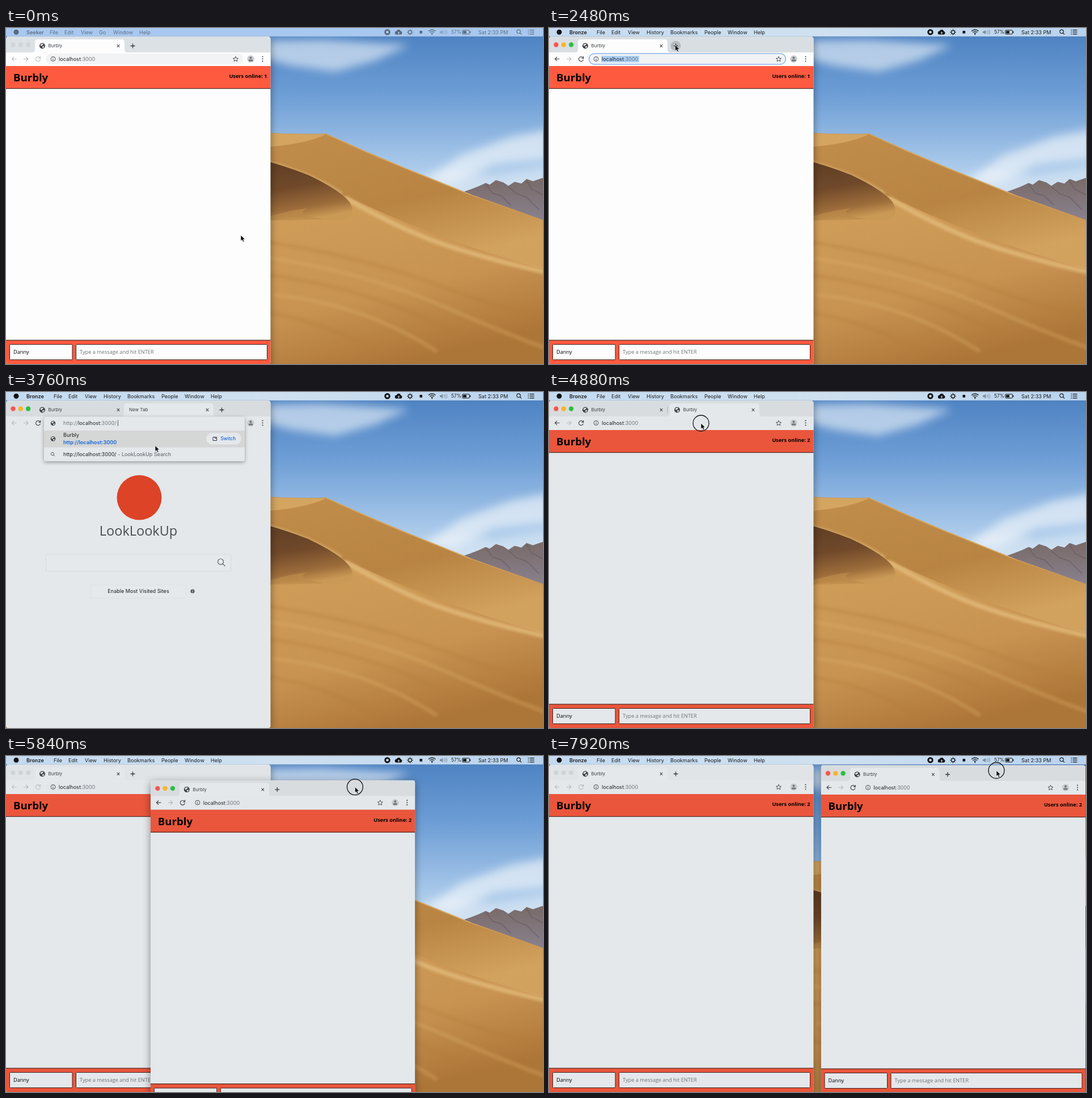
Recreate the animation shown at these times as an HTML page. Size 947 by 592 pixels, loop 8000 ms.

```html
<!DOCTYPE html>
<html lang="en">
<head>
<meta charset="utf-8">
<title>Chat demo</title>
<style>
  html, body { margin: 0; width: 100%; height: 100%; overflow: hidden; background: #c99a58; }
  svg { display: block; width: 947px; height: 592px; }
  text { font: 9.1px Inter, "Liberation Sans", sans-serif; fill: #1b1d20; white-space: pre; }
  .bold { font-weight: 600; }
  .tab { font-size: 8px; fill: #3c4043; }
  .page { font: 9.2px "Open Sans", "Noto Sans", sans-serif; fill: #000; }
  .title { font-size: 18.6px; font-weight: 700; }
  .users { font-weight: 700; }
  .hint { fill: #6f7274; }
  .brand { font: 23.5px "Open Sans", "Noto Sans", sans-serif; fill: #474c4f; }
  .win { filter: drop-shadow(0 4px 7px rgba(0,0,0,.42)); }
</style>
</head>
<body>
<svg viewBox="0 0 947 592">
  <defs>
    <linearGradient id="sky" x1="0" y1="0" x2="0" y2="1">
      <stop offset="0" stop-color="#4a7fc0"/><stop offset=".35" stop-color="#6f9fd6"/>
      <stop offset=".7" stop-color="#a9c9ea"/><stop offset="1" stop-color="#d6e4ef"/>
    </linearGradient>
    <linearGradient id="sand" x1=".2" y1="0" x2=".5" y2="1">
      <stop offset="0" stop-color="#c8934f"/><stop offset=".35" stop-color="#cf9c58"/>
      <stop offset=".7" stop-color="#c89351"/><stop offset="1" stop-color="#ad7639"/>
    </linearGradient>
    <linearGradient id="slope" x1="0" y1="0" x2=".5" y2="1">
      <stop offset="0" stop-color="#c18d4b"/><stop offset=".6" stop-color="#b5803f"/>
      <stop offset="1" stop-color="#d3a460"/>
    </linearGradient>
    <linearGradient id="hollow" x1="0" y1="0" x2=".25" y2="1">
      <stop offset="0" stop-color="#5c3b22"/><stop offset=".5" stop-color="#70492a"/>
      <stop offset=".82" stop-color="#9c6c3a"/><stop offset="1" stop-color="#c99955"/>
    </linearGradient>
    <linearGradient id="rock" x1="0" y1="0" x2="0" y2="1">
      <stop offset="0" stop-color="#796a68"/><stop offset="1" stop-color="#8a8391"/>
    </linearGradient>
    <linearGradient id="bar">
      <stop offset="0" stop-color="#c4daf0"/><stop offset=".5" stop-color="#cfe1f0"/><stop offset="1" stop-color="#b9d3ee"/>
    </linearGradient>
    <filter id="soft" x="-40%" y="-80%" width="180%" height="260%"><feGaussianBlur stdDeviation="8"/></filter>
    <filter id="haze" x="-20%" y="-40%" width="140%" height="180%"><feGaussianBlur stdDeviation="2.5"/></filter>
    <clipPath id="frame"><path d="M0 592V20Q0 15 5 15H461.500Q466.500 15 466.500 20V588Q466.500 592 462.500 592H4Q0 592 0 588Z"/></clipPath>
  </defs>

  <g id="desk">
    <rect width="947" height="345" fill="url(#sky)"/>
    <g fill="#eef4fa" filter="url(#soft)">
      <path d="M440 22L560 20L712 30L650 58L580 77L500 66L440 50Z" opacity=".62"/>
      <path d="M740 268L800 225L890 192L960 178V230L860 240L790 275Z" opacity=".68"/>
      <path d="M690 280L770 248L860 260L960 240V300H690Z" opacity=".4"/>
    </g>
    <path d="M806 289L820 284L833 279L846 273L853 276L864 268L877 272L886 278L897 271L909 274L918 266L929 270L947 264V345Z" fill="url(#rock)"/>
    <g fill="none" stroke="#5b5159" stroke-width="2" opacity=".4">
      <path d="M846 275L858 291L874 296L890 312M886 280L901 292L918 298L940 320M918 269L927 284L947 294"/>
    </g>
    <path d="M440 183Q505 188 565 186Q635 218 706 247L820 293L947 338V592H440Z" fill="url(#sand)"/>
    <path d="M440 184Q505 188 565 187Q524 207 440 211Z" fill="#d4a560"/>
    <path d="M440 211Q526 207 565 187Q635 221 706 249L820 295L947 340V425Q760 373 590 292Q540 258 440 230Z" fill="url(#slope)" opacity=".85"/>
    <g fill="none" filter="url(#haze)">
      <path d="M598 299Q700 358 780 384T960 432" stroke="#e6c080" stroke-width="8" opacity=".75"/>
      <path d="M440 232Q530 252 592 292" stroke="#e3bd7c" stroke-width="5" opacity=".8"/>
      <path d="M440 374Q620 400 760 452T970 512M440 432Q640 456 800 540M440 500Q570 510 700 600" stroke="#b17b3e" stroke-width="7" opacity=".28"/>
      <path d="M440 402Q620 425 770 490T960 566M470 470Q630 485 760 570" stroke="#dcae69" stroke-width="7" opacity=".35"/>
    </g>
    <path d="M440 229Q490 242 533 259Q590 286 606 307Q617 326 604 335Q593 340 560 337Q500 329 440 345Z" fill="url(#hollow)"/>
    <path d="M440 340Q500 320 532 318Q506 328 560 337" fill="#bd8b4b" opacity=".7"/>
    <path d="M565 187Q635 219 706 248L820 294" fill="none" stroke="#e0b873" stroke-width="1.200" opacity=".7"/>
  </g>
  <g id="wins"></g>
  <g id="menu"></g>
  <g id="pointer">
    <circle id="press" r="14" fill="none" stroke="#111" stroke-width="1.300"/>
    <path d="M0 0V10.200L2.300 8.100L4.100 12L6 11.200L4.300 7.400H7.500Z" fill="#000" stroke="#fff" stroke-width=".7"/>
  </g>
</svg>

<script>
const LOOP = 8000, STEP = 80;
const APP = 'Burbly', USER = 'Danny', ENGINE = 'LookLookUp';
const $ = id => document.getElementById(id);

const light = { page: '#fdfdfd', red: '#fe5a40', strip: '#d9dee2', idle: '#dce1e5', pill: '#f1f3f4' };
const dull = { page: '#e4e8eb', red: '#ea563c', strip: '#d8dcdf', idle: '#e0e4e7', pill: '#e3e7ea' };

const text = (x, y, s, cls = '', more = '') => `<text x="${x}" y="${y}" class="${cls}" ${more}>${s}</text>`;
const rect = (x, y, w, h, fill, more = '') => `<rect x="${x}" y="${y}" width="${w}" height="${h}" fill="${fill}" ${more}/>`;
const dot = (x, y, r, fill, more = '') => `<circle cx="${x}" cy="${y}" r="${r}" fill="${fill}" ${more}/>`;
const line = (d, color, w = 1.1, more = '') =>
  `<path d="${d}" fill="none" stroke="${color}" stroke-width="${w}" ${more}/>`;
const cross = (x, y) => line(`M${x - 2.3} ${y - 2.3}l4.600 4.600m0-4.600l-4.600 4.600`, '#44484c');
const plus = x => line(`M${x - 4} 31.500h8m-4-4v8`, '#33373b', 1.3);
const lens = (x, y, r, color, w = 1.1) =>
  dot(x, y, r, 'none', `stroke="${color}" stroke-width="${w}"`) +
  line(`M${x + r * .7} ${y + r * .7}l${r * .9} ${r * .9}`, color, w);
const globe = (x, y, s = 1) => `<g transform="translate(${x} ${y}) scale(${s})">${dot(0, 0, 5, '#3f4347')}
  <path d="M-3.800-1.500L-1-3.800L2-3.500L1-1.500L-1-.8L-1.500.8ZM0 1L2.500.3L3.600 1.500L1.500 3.700L.2 3.200Z" fill="#e4e8eb"/></g>`;

function tabShape(x, title, fill, icon = true) {
  const r = x + 158;
  return (fill ? `<path d="M${x - 5} 43q5 0 5-5V25q0-5 5-5H${r - 5}q5 0 5 5v13q0 5 5 5Z" fill="${fill}"/>` : '') +
    (icon ? globe(x + 13, 31.5) : '') +
    text(icon ? x + 23.5 : x + 9, 34.3, title, 'tab') + cross(x + 147, 31.5);
}

function chatPage(c, users) {
  const box = (x, w) => rect(x, 557.5, w, 27, c.page, 'stroke="#3a221d" rx="1"');
  return rect(0, 67, 467, 40, c.red) + rect(0, 106, 467, 1.2, '#4d2a22') +
    text(13, 94, APP, 'page title') +
    text(460.5, 88, 'Users online: ' + users, 'page users', 'text-anchor="end"') +
    rect(0, 550, 467, 42, c.red) + rect(0, 549.5, 467, 1.2, '#4d2a22') +
    box(6.5, 110.5) + box(123.5, 337) +
    text(13, 574.3, USER, 'page') + text(130, 574.3, 'Type a message and hit ENTER', 'page hint');
}

function newTabPage() {
  return dot(235, 186, 39.5, '#dc4327') + text(233.5, 252.5, ENGINE, 'brand', 'text-anchor="middle"') +
    rect(70.5, 286, 326, 29.5, '#e5e9ec', 'stroke="#d6dadd" rx="1"') + lens(378.5, 299, 5, '#5c6165', 1.2) +
    rect(150, 340, 167, 23, '#e5e9ec', 'stroke="#dde1e4" rx="2"') +
    text(233.5, 354.4, 'Enable Most Visited Sites', '', 'text-anchor="middle"') +
    dot(329, 351, 3.6, '#55595d') + rect(328.5, 350.3, 1, 2.8, '#e4e8eb') + rect(328.5, 348.7, 1, 1, '#e4e8eb');
}

const span = (s, color) => `<tspan fill="${color}">${s}</tspan>`;
const hostText = span('localhost', '#202124') + span(':3000', '#72777b');

function dropdown(c) {
  return `<g filter="drop-shadow(0 2px 3px rgba(0,0,0,.35))">${rect(67, 43.5, 354, 78.5, c.page, 'rx="4"')}</g>` +
    rect(67, 68, 354, 29.5, '#d5d6d6') + globe(83, 55, .85) + globe(83, 82.5, .85) +
    text(101, 58, span('http://', '#72777b') + hostText + span('/', '#72777b')) +
    rect(197, 49.5, .8, 10.5, '#333') +
    text(101, 79, APP) + text(101, 92, 'http://localhost:3000', 'bold', 'style="fill:#1266dc"') +
    rect(353, 72, 62, 20.5, '#e4e8ec', 'rx="10.2"') +
    line('M365 79.500h6.500v6h-6.500Zm3.500 0v2h3', '#34383c', 1) +
    text(378.5, 85, 'Switch', '', 'style="fill:#1a66d4;font-size:8.3px;font-weight:500"') +
    lens(82, 109, 2.6, '#5a5e62', 1) +
    text(101, 113, 'http://localhost:3000/' + span(' - ' + ENGINE + ' Search', '#565b60'));
}

function browser(o) {
  const c = o.c, two = o.second !== undefined, fresh = o.page === 'new';
  const dark = o.active ? '#3f4347' : '#b9bec2', pale = '#b4b9bd';
  const lamps = o.active ? ['#f4574f', '#f8b42f', '#2bbf41'] : Array(3).fill('#cfd4d7');
  let s = rect(0, 15, 467, 577, c.page) + rect(0, 15, 467, 28, o.active ? c.strip : c.idle);
  s += lamps.map((f, i) => dot(12.5 + i * 13.3, 29.5, 4.2, f)).join('');
  s += tabShape(51, APP, two ? '' : c.page);
  if (two) {
    s += rect(208.5, 25, .8, 13, '#a5aaae');
    s += tabShape(208 + o.second, fresh ? 'New Tab' : APP, c.page, !fresh);
  }
  if (o.hover) s += dot(223.5, 31.5, 9, '#b7bcc0');
  if (!o.second) s += plus(two ? 380.5 : 223.5);
  s += rect(0, 43, 467, 24, c.page);
  s += line('M18.500 54.500h-8m3.700-3.700l-3.700 3.700l3.700 3.700', fresh ? pale : dark, 1.2);
  s += line('M31 54.500h8m-3.700-3.700l3.700 3.700l-3.700 3.700', pale, 1.2);
  s += line('M59.800 52.300A4 4 0 1 0 60.500 55.500M60.700 50v3.300h-3.300', dark, 1.2);
  s += rect(70.5, 45, 347, 19, c.pill, o.select ? 'rx="9.5" stroke="#8eb4ea" stroke-width="1.6"' : 'rx="9.5"');
  if (o.select) s += rect(92.5, 49, 66.5, 11.5, '#add0f7');
  if (fresh) {
    if (!o.drop) s += lens(82, 54, 2.6, '#5a5e62', 1) + rect(101, 49.5, .8, 10.5, '#333');
  } else {
    s += dot(83, 54.5, 4, 'none', 'stroke="#4c5054"') + rect(82.5, 54, 1, 3, '#4c5054') + rect(82.5, 51.8, 1, 1.1, '#4c5054');
    s += text(93, 58, hostText);
    s += line('M405 50.200l1.300 3l3.200.3l-2.400 2.100l.7 3.200l-2.800-1.700l-2.800 1.700l.7-3.200l-2.400-2.100l3.200-.3Z', '#4a4e52', 1);
  }
  s += dot(431.5, 54.5, 6.3, '#c9cdd0') + dot(431.5, 52.6, 2.1, '#75797c') + rect(427.7, 55.5, 7.6, 3.2, '#75797c', 'rx="1.5"');
  s += [50.5, 54.5, 58.5].map(y => dot(452.5, y, 1.1, '#3f4347')).join('');
  s += fresh ? newTabPage() : chatPage(c, o.users);
  if (o.drop) s += dropdown(c);
  return `<g class="win"><g clip-path="url(#frame)">${s}</g></g>`;
}

function menuBar(own) {
  const k = '#101316';
  const items = own
    ? [[36, 'Bronze'], [84, 'File'], [110, 'Edit'], [139, 'View'], [172, 'History'], [214, 'Bookmarks'], [274, 'People'], [315, 'Window'], [361, 'Help']]
    : [[36, 'Seeker'], [77, 'File'], [103, 'Edit'], [132, 'View'], [164, 'Go'], [189, 'Window'], [235, 'Help']];
  const rays = 'M712.500 1.800v3M712.500 9.800v3M707 7.300h3M715 7.300h3M708.600 3.400l1.800 1.800M716.400 3.400l-1.800 1.800M708.600 11.200l1.800-1.800M716.400 11.200l-1.800-1.800';
  const icons = dot(672.5, 7.3, 5.2, k) + rect(670.5, 5.3, 4, 4, '#d5e3f0', 'rx=".8"') +
    `<path d="M689 11.500a3 3 0 0 1-.3-6a4 4 0 0 1 7.600.2a3 3 0 0 1 0 5.800Z" fill="${k}"/>` +
    line('M692.500 11v-4m-1.700 1.700l1.700-1.700l1.700 1.700', '#d5e3f0', 1) +
    line(rays, k, 1) + dot(712.5, 7.3, 3, 'none', `stroke="${k}" stroke-width="1.2"`) +
    rect(729.5, 5, 4.6, 4.6, k) +
    line('M745 5.500q6.300-5 12.600 0M747.300 7.700q4-3 8 0M749.500 9.600q1.800-1.400 3.600 0', k, 1.3) + dot(751.3, 11.2, 1, k) +
    `<g opacity=".38"><path d="M765 5.700h2.200l3-2.500v8.300l-3-2.500H765Z" fill="${k}"/>${line('M772 5q1.600 2.300 0 4.600M774 3.800q2.600 3.500 0 7M776 2.800q3.400 4.500 0 9', k, .9)}</g>` +
    text(785, 10.4, '57%', '', 'style="font-size:8.4px"') +
    rect(804.7, 3.8, 12.6, 7, 'none', `rx="1.3" stroke="${k}"`) + rect(806, 5.2, 6, 4.2, k) + rect(818, 5.8, 1.3, 3, k) +
    text(833, 10.6, 'Sat 2:33 PM') + lens(904, 6.3, 3.2, k) +
    line('M920.500 3.700h1.500m1.500 0h8M920.500 7.200h1.500m1.500 0h8M920.500 10.700h1.500m1.500 0h8', k, 1.2);
  return rect(0, 0, 947, 15, own ? 'url(#bar)' : '#a8c8ef') + rect(0, 14.3, 947, .7, '#8eaccb', 'opacity=".6"') +
    `<g opacity="${own ? 1 : .52}">${dot(18, 7.3, 4.5, k)}` +
    items.map(([x, s], i) => text(x, 10.6, s, i ? '' : 'bold')).join('') + icons + '</g>';
}

const tabbed = { c: dull, active: true, second: 0, users: 2 };
const scenes = [
  [0, { c: light, users: 1 }],
  [800, { c: light, users: 1, active: true }],
  [1440, { c: light, users: 1, active: true, select: true }],
  [2400, { c: light, users: 1, active: true, select: true, hover: true }],
  [2640, { ...tabbed, page: 'new' }],
  [3200, { ...tabbed, page: 'new', drop: true }],
  [4080, tabbed],
  [4800, { ...tabbed, second: 3 }],
  [4880, { ...tabbed, second: 5 }],
  [4960, { c: dull, users: 2 }]
];
const TORN = 4960;

// [time, x, y]
const mouse = [
  [0, 414, 365], [1840, 414, 365], [1920, 362, 338], [2000, 341, 294], [2080, 301, 230], [2160, 276, 160],
  [2240, 253, 100], [2320, 236, 64], [2400, 222.5, 30], [3040, 222.5, 30], [3600, 263, 94.500], [4160, 263, 94.500],
  [4560, 262, 31], [4720, 262, 31], [4880, 268, 55], [5120, 200, 78], [5360, 469, 75], [5440, 469, 75],
  [5600, 487.5, 73.5], [6160, 812.5, 25.5], [6480, 812.5, 25.5], [7680, 789, 25.5], [8000, 789, 25.5]
];
const torn = [
  [4960, 145, 30], [5120, 91, 47], [5440, 91, 47], [5600, 109, 45.500], [6160, 479.5, 0],
  [6960, 479.5, 0], [7200, 479.5, 1], [8000, 479.5, 1]
];
const presses = [[4720, 5160], [5400, 8000]];

function along(path, t) {
  let i = 1;
  while (i < path.length - 1 && path[i][0] <= t) i++;
  const [a, b] = [path[i - 1], path[i]];
  let k = Math.min(1, Math.max(0, (t - a[0]) / (b[0] - a[0])));
  if (b[0] - a[0] > STEP) k = k * k * (3 - 2 * k);
  return [a[1] + (b[1] - a[1]) * k, a[2] + (b[2] - a[2]) * k];
}

let shown = -1;
function draw(t) {
  const n = scenes.filter(s => s[0] <= t).length - 1;
  if (n !== shown) {
    shown = n;
    const split = scenes[n][0] >= TORN;
    $('wins').innerHTML = browser(scenes[n][1]) +
      (split ? `<g id="torn">${browser({ c: dull, active: true, users: 2 })}</g>` : '');
    $('menu').innerHTML = menuBar(n > 0);
  }
  if (t >= TORN) $('torn').setAttribute('transform', `translate(${along(torn, t)})`);
  $('pointer').setAttribute('transform', `translate(${along(mouse, t)})`);
  $('press').style.display = presses.some(([a, b]) => t >= a && t < b) ? '' : 'none';
}

const start = performance.now();
function tick() {
  const t = (performance.now() - start) % LOOP;
  draw(Math.floor(t / STEP) * STEP);
  requestAnimationFrame(tick);
}
tick();
</script>
</body>
</html>
```
